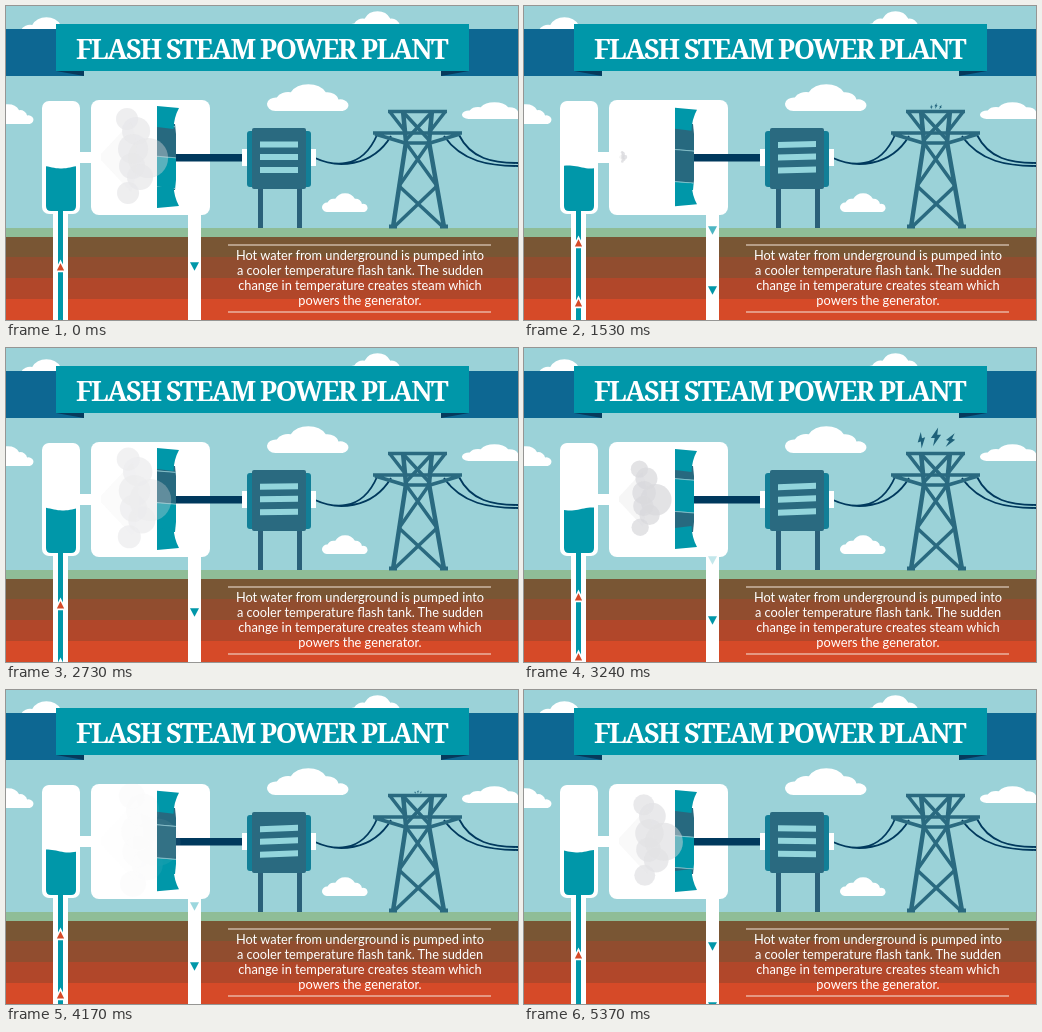
Recreate the animation shown at these times as an HTML page. Size 512x314 px, loop 5400 ms.

```html
<!DOCTYPE html>
<html lang="en">
<head>
<meta charset="utf-8">
<title>Flash Steam Power Plant</title>
<style>
html, body { margin: 0; width: 100%; height: 100%; overflow: hidden; background: #9bd2d8; }
svg { display: block; width: 512px; height: 314px; }
.title { font: bold 27px "Noto Serif", serif; letter-spacing: -1.6px; }
.note { font: 12.8px Lato, "Open Sans", sans-serif; }
text { fill: #fff; text-anchor: middle; }
</style>
</head>
<body>
<svg viewBox="0 0 512 314">
  <defs>
    <path id="cloud" fill="#fff" d="M6 26A6.5 6.5 0 0 1 7 13A9 9 0 0 1 17 8A14 14 0 0 1 42 8A8 8 0 0 1 51 15A5.6 5.6 0 0 1 54 26Z"/>
    <path id="bolt" d="M2.500-11L-6 1.500L-1.500 1.500L-3.500 11L6-2.500L1.500-2.500Z"/>
    <clipPath id="rotorShape">
      <path d="M151 118H169L170 128V174L169 184H151Z"/>
    </clipPath>
    <path id="flare" fill="#0097a9" d="M151-51L173-49Q168-40 167.500-28L151-30Z"/>
  </defs>

  <rect width="512" height="314" fill="#9bd2d8"/>
  <g id="clouds"></g>

  <!-- ribbon -->
  <path fill="#0d6792" d="M0 23H78V70H0ZM435 23H512V70H435Z"/>
  <path fill="#063a5c" d="M50 65H78V70ZM463 65H435V70Z"/>
  <rect x="50" y="18" width="413" height="47" fill="#0097a9"/>
  <text class="title" x="255.500" y="52.500">FLASH STEAM POWER PLANT</text>

  <!-- ground -->
  <rect y="222" width="512" height="10" fill="#8fbd97"/>
  <rect y="231" width="512" height="21" fill="#795634"/>
  <rect y="251" width="512" height="22" fill="#914d2f"/>
  <rect y="272" width="512" height="22" fill="#b1472a"/>
  <rect y="293" width="512" height="21" fill="#d64a28"/>

  <!-- cables and pylon -->
  <g fill="none" stroke="#00395d" stroke-width="1.800">
    <path d="M309 152C325 159 355 166 371 129M309 152C330 162 366 162 385 130"/>
    <path d="M453 129C465 153 487 157 512 157M438 130C456 156 484 160 512 160"/>
  </g>
  <g fill="none" stroke="#2a6a80" stroke-width="3.500" stroke-linejoin="round">
    <path stroke-width="4.500" d="M397 105L400 136L387 221M426 105L423 136L438 221"/>
    <path d="M382 105.500H441M384 106L398 124M439 106L425 124"/>
    <path d="M367 127H456M369 128L399 137H424L454 128"/>
    <path d="M398 107L424 135M425 107L399 135M400 137L431 180M423 137L393 180M393 180L437 221M431 180L388 221"/>
    <path stroke-width="4" d="M383 220.500H391M434 220.500H442"/>
  </g>
  <g id="bolts" fill="#1f617a">
    <use href="#bolt" transform="translate(-17 -15) rotate(-18) scale(.85)"/>
    <use href="#bolt" transform="translate(0 -19)"/>
    <use href="#bolt" transform="translate(17 -15) rotate(18) scale(.85)"/>
  </g>

  <!-- generator -->
  <path fill="#2a6079" d="M252 182H257V222H252ZM291 182H296V222H291Z"/>
  <path fill="#fff" d="M236 143H242V160H236ZM304 143H310V160H304Z"/>
  <rect x="241" y="125" width="64" height="56" rx="3" fill="#127f97"/>
  <rect x="246" y="122" width="54" height="61" rx="2" fill="#2a6a80"/>
  <path id="coils" fill="#93d5dc"/>

  <!-- vessels -->
  <g fill="#fff">
    <path d="M47 200H62V314H47ZM182 200H195V314H182ZM70 146H90V157H70Z"/>
    <rect x="36" y="95" width="38" height="113" rx="7"/>
    <rect x="85" y="94" width="119" height="115" rx="8"/>
  </g>
  <path id="water" fill="#0097a9"/>
  <rect x="52" y="203" width="5" height="111" fill="#0097a9"/>
  <g id="arrows"></g>
  <path fill="#00395d" d="M169 148H236V155.500H169Z"/>
  <g id="rotor" clip-path="url(#rotorShape)"></g>
  <use id="flareTop" href="#flare"/>
  <use id="flareBottom" href="#flare"/>
  <g id="steam"></g>

  <!-- caption -->
  <path stroke="#f4e6dc" d="M222 239H485M222 306H485"/>
  <g class="note" id="note"></g>
</svg>
<script>
const NS = "http://www.w3.org/2000/svg";
const LOOP = 5400, FLOW = 450, PUFF = 675, SPARK = 1350;
const el = id => document.getElementById(id);
const clamp = v => Math.max(0, Math.min(1, v));
const set = (node, attrs) => {
  for (const k in attrs) node.setAttribute(k, attrs[k]);
  return node;
};
const add = (parent, tag, attrs) =>
  parent.appendChild(set(document.createElementNS(NS, tag), attrs));

// x, y, width, height
[[7, 11, 68, 26], [341, 5, 62, 25], [261, 78, 84, 27],
 [-24, 98, 53, 20], [456, 96, 66, 17], [316, 187, 47, 19]
].forEach(([x, y, w, h]) => add(el("clouds"), "use", {
  href: "#cloud", transform: `translate(${x} ${y}) scale(${w / 60} ${h / 26})`
}));

["Hot water from underground is pumped into",
 "a cooler temperature flash tank. The sudden",
 "change in temperature creates steam which",
 "powers the generator."
].forEach((line, i) => {
  add(el("note"), "text", { x: 354, y: 253.5 + i * 15.3 }).textContent = line;
});

const up = [], down = [];
for (let i = 0; i < 3; i++) {
  up.push(add(el("arrows"), "path", {
    d: "M0-5.500L5 4.500H-5Z", fill: "#d64a28", stroke: "#fff", "stroke-width": 1.6
  }));
  down.push(add(el("arrows"), "path", { d: "M-4.500-4H4.500L0 4.500Z", fill: "#0097a9" }));
}

const SHADES = ["#0097a9", "#27697f", "#27697f"];
const blades = Array.from({ length: 9 }, (_, i) =>
  add(el("rotor"), "path", { fill: SHADES[i % 3], stroke: "#8fc9d1", "stroke-width": .7 }));

// offsets from the nozzle at full size: x, y, radius
const PUFFS = [[26, -38, 11], [35, -26, 14], [32, -8, 15], [31, 9, 13],
               [39, 20, 13], [27, 36, 11], [47, 1, 20]];
const clusters = [0, 1].map(() => {
  const g = add(el("steam"), "g", {});
  add(g, "path", { d: "M0-3L30-35Q42 0 30 35L0 3Z", fill: "#dedede", opacity: .3 });
  PUFFS.forEach(([cx, cy, r]) => add(g, "circle", { cx, cy, r, fill: "#d6d6d9", opacity: .75 }));
  return g;
});

function drawFlow(t) {
  const shift = (t % FLOW) / FLOW * 60;
  for (let i = 0; i < 3; i++) {
    const yUp = 261 + i * 60 - shift;
    const yDown = 200 + i * 60 + shift;
    set(up[i], { transform: `translate(54.500 ${yUp})`, opacity: clamp((yUp - 217) / 16) });
    set(down[i], { transform: `translate(188.500 ${yDown})`, opacity: clamp((yDown - 206) / 26) });
  }
}

function drawWater(t) {
  const phase = t / PUFF * 2 * Math.PI;
  let d = "M40 200";
  for (let x = 40; x <= 70; x += 2) {
    d += `L${x} ${161 + 1.5 * Math.sin(x / 7 - phase)}`;
  }
  set(el("water"), { d: d + "V200Q70 205 65 205H45Q40 205 40 200Z" });
}

function drawRotor(t) {
  const step = 2 * Math.PI / 9;
  const turn = t / PUFF * step * 3;
  blades.forEach((blade, i) => {
    const a = i * step + turn, b = a + step;
    const top = Math.cos(a) > 0 ? 151 + 48 * Math.sin(a) : 100;
    const bottom = Math.cos(b) > 0 ? 151 + 48 * Math.sin(b) : 202;
    set(blade, {
      d: `M150 ${top - 1}L174 ${top + 1}V${bottom + 1}L150 ${bottom - 1}Z`,
      visibility: Math.cos(a) > 0 || Math.cos(b) > 0 ? "visible" : "hidden"
    });
  });
  const squeeze = 1.5 * (1 - Math.cos(t / PUFF * 2 * Math.PI));
  set(el("flareTop"), { transform: `translate(0 ${151 + squeeze})` });
  set(el("flareBottom"), { transform: `translate(0 ${151 - squeeze}) scale(1 -1)` });
}

function drawSteam(t) {
  clusters.forEach((g, i) => {
    const age = t % PUFF + i * PUFF;
    const size = Math.max(0, (age - 135) / 540) ** .85;
    const fade = clamp((age - 135) / 40) * (1 - clamp((age - 590) / 230));
    set(g, { transform: `translate(95 151) scale(${size})`, opacity: fade * .9 });
  });
}

function drawBolts(t) {
  const age = t % SPARK;
  const rise = Math.min(34.5, Math.max(0, .0456 * (age - 18)));
  const fade = 1 - clamp((age - 690) / 200);
  set(el("bolts"), {
    transform: `translate(412 105) scale(${rise / 28})`,
    opacity: age > 40 ? fade : 0
  });
}

function drawCoils(t) {
  const tilt = .8 * Math.sin(t / FLOW * 2 * Math.PI);
  let d = "";
  for (const y of [135.5, 148, 161]) {
    d += `M254 ${y + tilt}L292 ${y - tilt}V${y + 6 - tilt}L254 ${y + 6 + tilt}Z`;
  }
  set(el("coils"), { d });
}

function frame() {
  const t = performance.now() % LOOP;
  [drawFlow, drawWater, drawRotor, drawSteam, drawBolts, drawCoils].forEach(draw => draw(t));
  requestAnimationFrame(frame);
}
frame();
</script>
</body>
</html>
```
